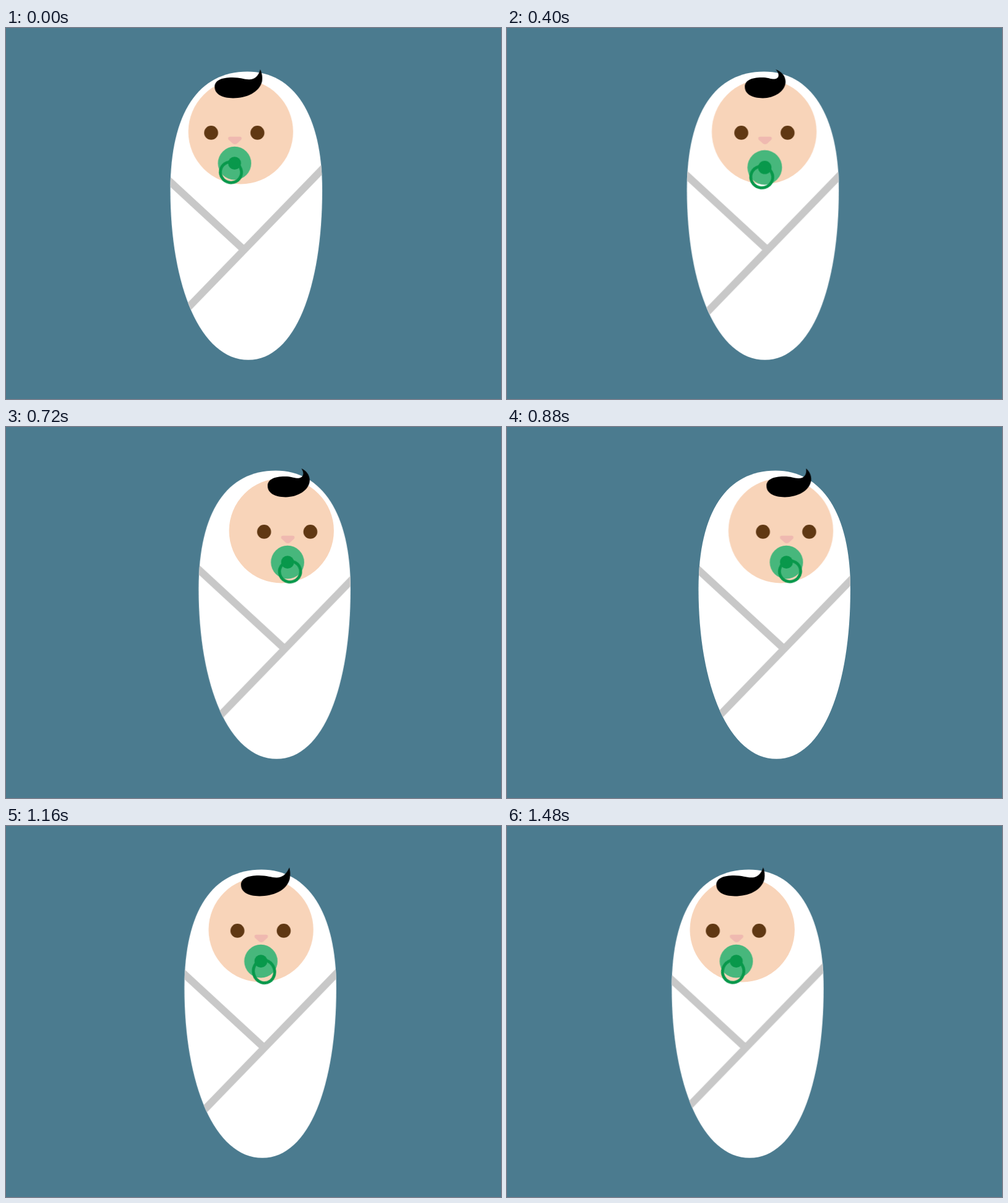
Animation of 800x600 px, one loop 1520 ms. Source, as an HTML page without scripts:

```html
<!DOCTYPE html>
<html lang="en">
<head>
<meta charset="utf-8">
<title>Swaddled baby</title>
<style>
  html, body { margin: 0; width: 100%; height: 100%; overflow: hidden; background: #4b7b8f; }
  svg { display: block; width: 100%; height: 100%; }

  /* Layers share one sway; a larger --shift reads as closer to the viewer. */
  .sway { animation: sway 1520ms -1490ms infinite ease-in-out; }
  .blanket { --shift: 45.8px; }
  .folds { --shift: 20.1px; }
  .face { --shift: 66px; }
  .features { --shift: 85.8px; }
  @keyframes sway {
    0%, 100% { transform: none; }
    46.05%, 48.68% { transform: translateX(var(--shift)); }
  }

  .hair { animation: curl 1520ms -1040ms infinite ease-in-out; }
  @keyframes curl {
    0%, 100% { d: path("M49 67C58 76 54 83.5 45 82.5C39 82 38 80 27 80C11 80 0 85 0 95C0 107 12 113.4 29 113.4C48 113.4 65.5 102 65.5 87C65.5 77 58 70 49 67Z"); }
    53.95% { d: path("M80 67C74 79 67 83.5 58 83.5C50 83.5 42 80 29 80C11 80 0 85 0 95C0 107 12 113.4 30 113.4C52 113.4 74 105 79.5 86C81 79 81 73 80 67Z"); }
  }

  .pacifier, .ring { transform-origin: 369.2px 218.7px; }
  .pacifier { animation: suck 1520ms infinite ease-in-out; }
  @keyframes suck {
    0%, 14%, 36.5%, 100% { transform: none; }
    25.5% { transform: translateY(6.9px) scale(1.04); }
  }

  .ring { animation: swing 1520ms infinite linear; }
  @keyframes swing {
    0% { transform: rotate(22deg); }
    10.53% { transform: rotate(21.6deg) scaleY(1.2); }
    26.32% { transform: rotate(17.3deg); }
    36.84% { transform: rotate(0deg); }
    47.37% { transform: rotate(-15deg); }
    57.89% { transform: rotate(-22deg); }
    65% { transform: rotate(-22deg) scaleY(1.04); }
    76.32% { transform: rotate(-17deg) scaleY(1.11); }
    86.84% { transform: rotate(1deg) scaleY(1.13); }
    97.37% { transform: rotate(16.7deg) scaleY(1.09); }
    100% { transform: rotate(22deg); }
  }
</style>
</head>
<body>
<svg viewBox="0 0 800 600">
  <defs>
    <path id="egg" d="M390 70.5C465 70.5 511 140 511 262C511 418 467.5 536.8 391.5 536.8C314.5 536.8 265.5 418 265.5 262C265.5 136 312 70.5 390 70.5Z"/>
    <clipPath id="wrap"><use href="#egg"/></clipPath>
  </defs>

  <g class="sway blanket">
    <use href="#egg" fill="#fff"/>
    <g clip-path="url(#wrap)">
      <path class="sway folds" d="M600 136.3L240 508.2M206 194.2L384 358.3" fill="none" stroke="#c8c8c8" stroke-width="12"/>
    </g>
  </g>

  <circle class="sway face" cx="379.2" cy="167.8" r="84.7" fill="#f8d4b9"/>

  <g class="sway features">
    <g transform="translate(337)"><path class="hair" d="M49 67"/></g>
    <g fill="#603813">
      <circle cx="331.3" cy="169.4" r="11.3"/>
      <circle cx="406.1" cy="169.4" r="11.3"/>
    </g>
    <path d="M362 175.8H377.4C381 175.8 381.6 179.5 379 181.5L373 187Q369.7 189.2 366.4 187L360.4 181.5C357.8 179.5 358.4 175.8 362 175.8Z" fill="#efb9b0"/>
    <g class="pacifier">
      <circle cx="369.2" cy="218.7" r="26.9" fill="#47b77c"/>
      <circle cx="369.2" cy="218.7" r="10.4" fill="#08984b"/>
      <ellipse class="ring" cx="369.2" cy="234.4" rx="17.1" ry="16.7" fill="none" stroke="#08984b" stroke-width="4.8" vector-effect="non-scaling-stroke"/>
    </g>
  </g>
</svg>
</body>
</html>
```
